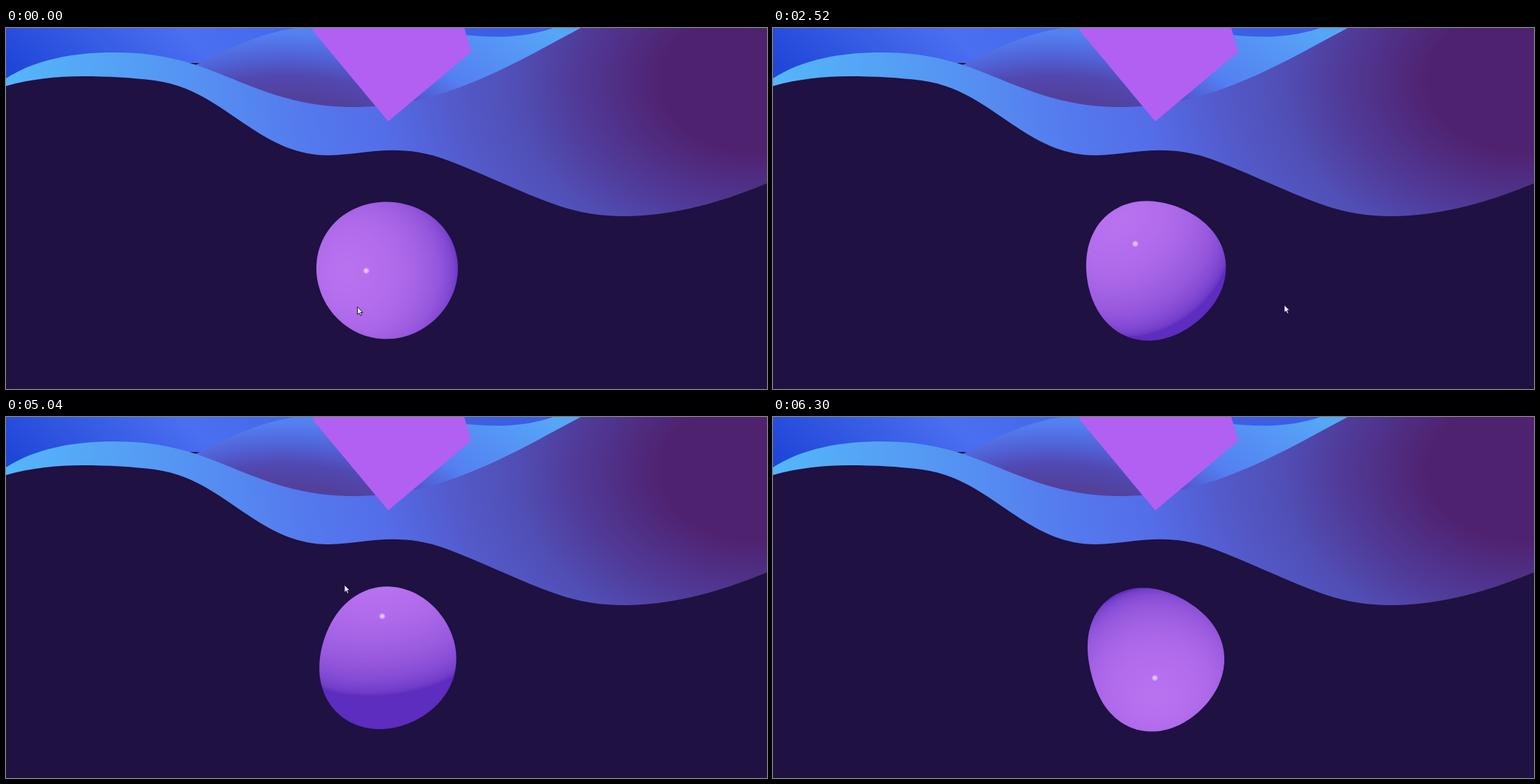
Animation, 1086 px wide and 516 px high, one loop 6.37 s. Source, as an HTML page with a canvas:

```html
<!DOCTYPE html>
<html lang="en">
<head>
<meta charset="utf-8">
<title>Blob</title>
<style>
html, body { margin: 0; width: 100%; height: 100%; overflow: hidden; background: #1f1142; }
svg, canvas { position: absolute; left: 0; top: 0; display: block; }
</style>
</head>
<body>
<svg width="1086" height="516" viewBox="0 0 1086 516">
  <defs>
    <linearGradient id="back" gradientUnits="userSpaceOnUse" x1="20" y1="70" x2="440" y2="-360">
      <stop offset="0" stop-color="#2046d8"/>
      <stop offset=".35" stop-color="#4a6ff0"/>
      <stop offset=".87" stop-color="#3c5ee4"/>
    </linearGradient>
    <radialGradient id="middle" gradientUnits="userSpaceOnUse" cx="0" cy="0" r="500"
      gradientTransform="translate(400 200) scale(1 .6)">
      <stop offset=".34" stop-color="#53409c"/>
      <stop offset=".44" stop-color="#5148b0"/>
      <stop offset=".53" stop-color="#5062d6"/>
      <stop offset=".64" stop-color="#5480f2"/>
      <stop offset="1" stop-color="#56a6f6"/>
    </radialGradient>
    <radialGradient id="front" gradientUnits="userSpaceOnUse" cx="0" cy="0" r="1080"
      gradientTransform="translate(1070 75) scale(1 .75)">
      <stop offset=".125" stop-color="#4f2270"/>
      <stop offset=".25" stop-color="#503d9c"/>
      <stop offset=".32" stop-color="#514fb6"/>
      <stop offset=".4" stop-color="#535aca"/>
      <stop offset=".5" stop-color="#546de9"/>
      <stop offset=".6" stop-color="#5479ee"/>
      <stop offset=".72" stop-color="#558ef1"/>
      <stop offset="1" stop-color="#54b8fa"/>
    </radialGradient>
  </defs>
  <path fill="url(#back)" d="M0 0H800V50H150L0 77Z"/>
  <path fill="url(#middle)" d="M270 53C310 33 360 8 412 0L440 -5H640L656 10C700 15 742 13 781 0H822L600 125H400L300 85Z"/>
  <path fill="url(#front)" d="M0 72C42 45 96 35 154 35C200 35 234 41 272 53C346 79 400 113 496 113
    C620 113 710 59 820 0H1086V222C1012 253 944 269 882 269C846 269 812 263 780 251
    C735 235 680 208 630 189C558 162 508 182 460 182C358 182 312 88 212 75
    C180 71 146 69 108 69C74 69 34 73 0 83Z"/>
  <path fill="#b160f2" d="M440 0L437 3L545.500 133.500L664 34L654 0Z"/>
</svg>
<canvas id="stage" width="1086" height="516"></canvas>
<script>
const STEP = 70, LOOP = 6370, LAST = LOOP - STEP;
const CX = 543.6, CY = 345.7, R = 99.5, SIZE = 230;
const ctx = document.getElementById('stage').getContext('2d');
const ball = document.createElement('canvas');
ball.width = ball.height = SIZE;
const ballCtx = ball.getContext('2d');
const pixels = ballCtx.createImageData(SIZE, SIZE);

// key points: time, x, y
const glintPath = [
  [0, 514, 347], [830, 559, 343], [1820, 519, 299], [3220, 515, 318],
  [4410, 522, 328], [5390, 543, 267], [LAST, 545, 373]
];
const pointerPath = [
  [0, 501, 398], [420, 687, 355], [830, 513, 331], [1190, 659, 340], [1600, 500, 300],
  [1820, 593, 265], [2380, 735, 405], [3220, 655, 275], [3710, 331, 380],
  [4410, 825, 414], [5250, 419, 207], [5390, 446, 249], [5950, 668, 400], [LAST, 545, 430]
];

function along(path, t) {
  const i = Math.max(1, path.findIndex(p => p[0] >= t));
  const [t0, x0, y0] = path[i - 1], [t1, x1, y1] = path[i];
  const f = (t - t0) / (t1 - t0), e = f * f * (3 - 2 * f);
  return [x0 + (x1 - x0) * e, y0 + (y1 - y0) * e];
}

// A circle bent by slowly swinging two- and three-lobed waves
function blobPath(t) {
  const s = t / 1000;
  const stretch = 2 * Math.cos(.5 * s) - .5;
  const shear = .55 * s * Math.cos(1.95 * (s - 3.3));
  const lobeX = 1.9 + 1.6 * Math.cos(1.5 * (s - 6.2));
  const lobeY = 2 * Math.sin(1.75 * (s - .25));
  const path = new Path2D();
  for (let i = 0; i < 120; i++) {
    const a = i * Math.PI / 60;
    const r = R + stretch * Math.cos(2 * a) + shear * Math.sin(2 * a)
      + lobeX * Math.cos(3 * a) + lobeY * Math.sin(3 * a);
    path.lineTo(CX + r * Math.cos(a), CY + r * Math.sin(a));
  }
  path.closePath();
  return path;
}

// The glint lies halfway between the viewer and the light
function lightFrom(x, y) {
  const hx = (x - CX) / 108, hy = (y - CY) / 108;
  const hz = Math.sqrt(1 - hx * hx - hy * hy);
  return [2 * hz * hx, 2 * hz * hy, 2 * hz * hz - 1];
}

function shade([lx, ly, lz]) {
  const wrap = .1, data = pixels.data;
  for (let y = 0, i = 0; y < SIZE; y++) {
    for (let x = 0; x < SIZE; x++, i += 4) {
      let nx = (x - SIZE / 2) / R * .88, ny = (y - SIZE / 2) / R * .88;
      const over = Math.max(1, Math.hypot(nx, ny) / .97);
      nx /= over;
      ny /= over;
      const nz = Math.sqrt(1 - nx * nx - ny * ny);
      const m = Math.sqrt(Math.max(0, (nx * lx + ny * ly + nz * lz + wrap) / (1 + wrap)));
      data[i] = 92 + 92 * m;
      data[i + 1] = 45 + 68 * m;
      data[i + 2] = 190 + 49 * m;
      data[i + 3] = 255;
    }
  }
  ballCtx.putImageData(pixels, 0, 0);
}

function drawGlint(x, y) {
  const g = ctx.createRadialGradient(x, y, 0, x, y, 5);
  g.addColorStop(0, 'rgba(255,250,255,.7)');
  g.addColorStop(.5, 'rgba(250,235,255,.6)');
  g.addColorStop(1, 'rgba(240,210,255,0)');
  ctx.fillStyle = g;
  ctx.fillRect(x - 5, y - 5, 10, 10);
}

const arrow = new Path2D('M.5 .5V11.500L3 9.200L4.800 13L6.700 12.200L5 8.500H8.300Z');

function drawPointer(t) {
  if (t >= LAST) return;
  const [x, y] = along(pointerPath, t);
  if (Math.abs(t - 4410) <= STEP) {
    ctx.fillStyle = '#8a8424';
    ctx.beginPath();
    ctx.arc(x, y, 8.5, 0, Math.PI * 2);
    ctx.fill();
  }
  ctx.save();
  ctx.translate(x, y);
  ctx.fillStyle = '#f5ecfb';
  ctx.strokeStyle = '#1f1142';
  ctx.fill(arrow);
  ctx.stroke(arrow);
  ctx.restore();
}

function draw(t) {
  const glint = along(glintPath, t);
  shade(lightFrom(...glint));
  ctx.clearRect(0, 0, 1086, 516);
  ctx.save();
  ctx.clip(blobPath(t));
  ctx.drawImage(ball, CX - SIZE / 2, CY - SIZE / 2);
  ctx.restore();
  drawGlint(...glint);
  drawPointer(t);
}

const start = performance.now();
let shown = -1;
function tick() {
  // steps fall up to 10 ms early
  const now = (performance.now() - start) % LOOP + 10;
  const t = Math.min(LAST, Math.floor(now / STEP) * STEP);
  if (t !== shown) draw(shown = t);
  requestAnimationFrame(tick);
}
tick();
</script>
</body>
</html>
```
